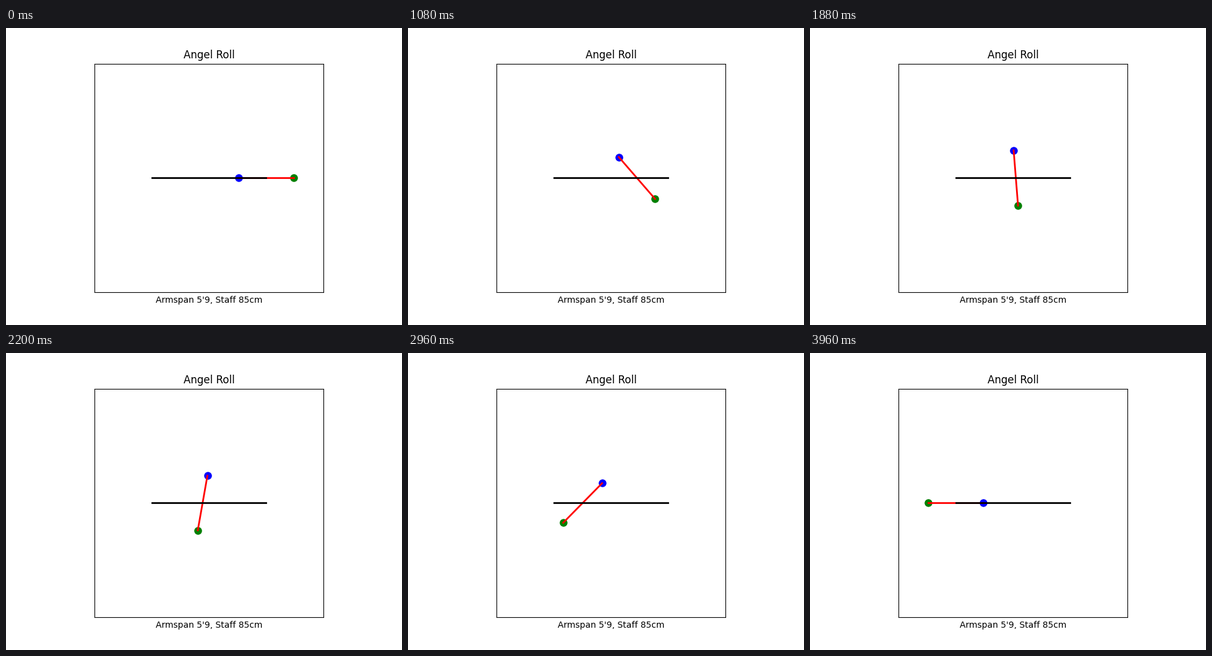
A matplotlib script that plays this animation: 640 px wide and 480 px high, repeating every 4 s.

```python
import numpy as np
import matplotlib.pyplot as plt
from matplotlib.animation import FuncAnimation

FRAMES = 100
ARMSPAN = 69 * 2.54   # 5'9 in cm
STAFF = 85

fig, ax = plt.subplots(figsize=(6.4, 4.8), dpi=100)
ax.set_aspect("equal")
ax.set_xlim(-ARMSPAN, ARMSPAN)
ax.set_ylim(-ARMSPAN, ARMSPAN)
ax.set_xticks([])
ax.set_yticks([])
ax.set_title("Angel Roll")
ax.set_xlabel("Armspan 5'9, Staff 85cm")

blue_end, = ax.plot([], [], "o", color="blue", markersize=8)
green_end, = ax.plot([], [], "o", color="green", markersize=8)
staff, = ax.plot([], [], color="red", lw=2)
ax.plot([-ARMSPAN / 2, ARMSPAN / 2], [0, 0], color="black", lw=2)


def update(i):
    """Roll the staff along the arms, half a turn from one hand to the other."""
    p = i / (FRAMES - 1)
    center = ARMSPAN * (0.5 - p)
    angle = -np.pi * p
    dx = STAFF / 2 * np.cos(angle)
    dy = STAFF / 2 * np.sin(angle)
    blue_end.set_data([center - dx], [-dy])
    green_end.set_data([center + dx], [dy])
    staff.set_data([center - dx, center + dx], [-dy, dy])
    return blue_end, green_end, staff


anim = FuncAnimation(fig, update, frames=FRAMES, interval=40,
                     repeat=True, repeat_delay=0)
plt.show()
```
